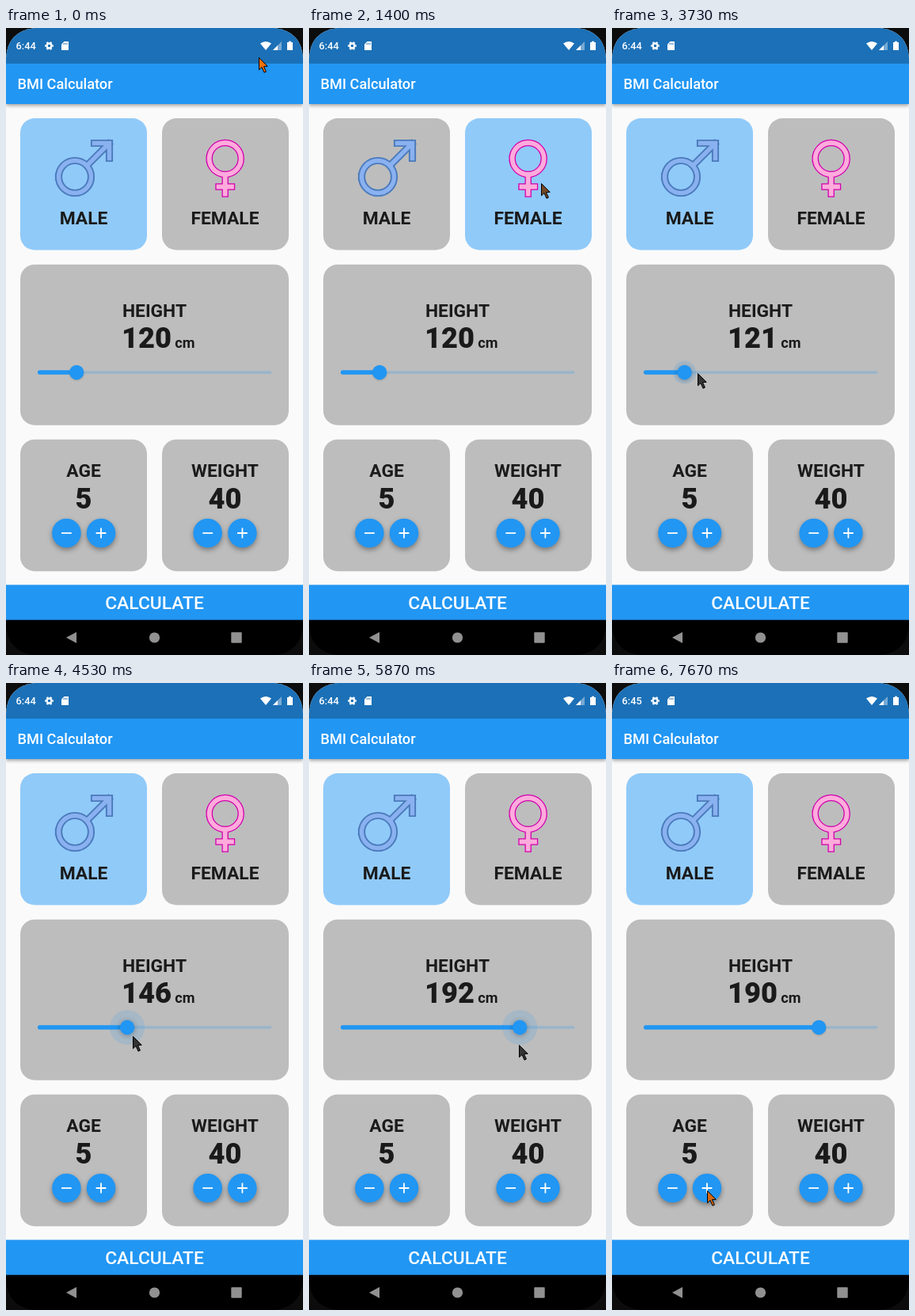
An HTML page that plays this animation: 375 px wide and 792 px high, repeating every 8 s.

```html
<!DOCTYPE html>
<html lang="en">
<head>
<meta charset="utf-8">
<title>BMI Calculator</title>
<style>
  html, body { margin: 0; width: 100%; height: 100%; overflow: hidden; background: #0c0c0c; }
  svg { display: block; width: 375px; height: 792px; font-family: Roboto, sans-serif; }
  .card { fill: #bdbdbd; }
  .card.on { fill: #90caf9; }
  .label, .number, .unit { fill: #1a1a1a; font-weight: 700; }
  .label { font-size: 22.8px; text-anchor: middle; }
  .number { font-size: 36.2px; font-weight: 900; }
  .unit { font-size: 18.2px; }
  .mid { text-anchor: middle; }
  .white { fill: #fff; font-weight: 500; }
  .bar { filter: drop-shadow(0 2px 2px rgba(0, 0, 0, .36)); }
  .button { filter: drop-shadow(0 3px 3px rgba(0, 0, 0, .36)); }
  .sign path { fill: none; stroke-linecap: square; }
</style>
</head>
<body>
<svg viewBox="0 0 375 792">
  <clipPath id="screen"><path d="M0 754V38Q2 4 36 0H339Q373 4 375 38V754Q373 788 339 792H36Q2 788 0 754Z"/></clipPath>

  <g clip-path="url(#screen)">
    <rect width="375" height="748" fill="#fafafa"/>
    <rect class="bar" y="45" width="375" height="51" fill="#2196f3"/>
    <rect width="375" height="45" fill="#1b70b7"/>
    <rect y="703.4" width="375" height="45" fill="#2196f3"/>
    <rect y="747.7" width="375" height="45"/>
  </g>

  <!-- status bar -->
  <text id="clock" class="white" x="12.5" y="27" font-size="12.8"></text>
  <g fill="#fff">
    <g fill="none" stroke="#fff">
      <circle cx="54.5" cy="22.5" r="3" stroke-width="2.4"/>
      <circle cx="54.5" cy="22.5" r="4.7" stroke-width="1.5" pathLength="12" stroke-dasharray="1" stroke-dashoffset=".5"/>
    </g>
    <path d="M73.5 17H79V28H70V20.5Z"/>
    <path d="M321 19.6Q328 14.4 335 19.6L328 28Z"/>
    <path d="M348 17V28H337Z" opacity=".4"/>
    <path d="M343 22V28H337Z"/>
    <path d="M355 18H357V16.7H360V18H362V28H355Z"/>
  </g>
  <path d="M73 19V21M75 19V21M77 19V21" stroke="#1b70b7" stroke-width=".9"/>
  <text class="white" x="14.5" y="77" font-size="18.2">BMI Calculator</text>

  <!-- gender cards -->
  <rect id="maleCard" class="card" x="18" y="114" width="160" height="166.5" rx="18.3"/>
  <rect id="femaleCard" class="card" x="197" y="114" width="160" height="166.5" rx="18.3"/>
  <g id="signs" class="sign"></g>
  <text class="label" x="98" y="248">MALE</text>
  <text class="label" x="276.5" y="248">FEMALE</text>

  <!-- height card -->
  <rect class="card" x="18" y="298.7" width="339" height="203" rx="18.3"/>
  <text class="label" x="187.5" y="365">HEIGHT</text>
  <text id="height" class="number" x="146" y="404"></text>
  <text class="unit" x="213.3" y="404">cm</text>
  <path d="M42 435H333.5" stroke="#98b4ca" stroke-width="3.7" stroke-linecap="round"/>
  <path id="active" stroke="#2196f3" stroke-width="5.5" stroke-linecap="round"/>
  <circle id="halo" cy="435" fill="#2196f3" opacity=".14"/>
  <circle id="thumb" cy="435" r="9.2" fill="#2196f3"/>

  <!-- age and weight cards -->
  <rect class="card" x="18" y="519.7" width="160" height="166.5" rx="18.3"/>
  <rect class="card" x="197" y="519.7" width="160" height="166.5" rx="18.3"/>
  <text class="label" x="98" y="567.3">AGE</text>
  <text class="label" x="276.5" y="567.3">WEIGHT</text>
  <text class="number mid" x="98" y="607">5</text>
  <text class="number mid" x="276.5" y="607">40</text>
  <g id="buttons"></g>

  <!-- bottom bars -->
  <text class="white mid" x="187.5" y="733.6" font-size="22.8">CALCULATE</text>
  <g fill="#919191">
    <path d="M76 770L89 763V777Z"/>
    <circle cx="187.5" cy="770" r="6.6"/>
    <rect x="284.3" y="763.3" width="13.4" height="13.4" rx="1"/>
  </g>

  <path id="cursor" d="M.5 .5V15.8L4 12.5L7 19.2L9.4 18.1L6.5 11.6L11.2 11.3Z" stroke="#000" stroke-linejoin="round"/>
</svg>

<script>
const $ = id => document.getElementById(id);
const LOOP = 8000, STEPS = 120;

const ring = (x, y, r) => `M${x - r} ${y}a${r} ${r} 0 1 0 ${2 * r} 0a${r} ${r} 0 1 0 ${-2 * r} 0`;
// Each sign is a wide outline stroke with a narrower fill stroke on top.
const sign = (d, dark, light, wide, narrow) =>
  `<path d="${d}" stroke="${dark}" stroke-width="${wide}"/><path d="${d}" stroke="${light}" stroke-width="${narrow}"/>`;
$('signs').innerHTML =
  sign(ring(87, 188, 20.5) + 'M105.5 170.5L129.5 146.5M111.5 145.5H130.5V164.5', '#4a7abb', '#8ab1f0', 9.2, 5.4) +
  sign(ring(276.7, 165, 20) + 'M276.7 189V209.5M268.5 200.5H285', '#d100ad', '#ffabdc', 8.4, 5.8);

$('buttons').innerHTML = [76.4, 120, 254.7, 298.4].map((x, i) =>
  `<g transform="translate(${x} 638)"><circle class="button" r="18.3" fill="#2196f3"/>
   <path d="M-6.4 0H6.4${i % 2 ? 'M0-6.4V6.4' : ''}" stroke="#fff" stroke-width="1.8"/></g>`).join('');

const ramp = (step, from, to) => Math.min(1, Math.max(0, (step - from) / (to - from)));
const pulse = (step, from, to, fade) => ramp(step, from, from + fade) * (1 - ramp(step, to, to + fade));
const mix = (from, to, f) => from + (to - from) * f;

// Pointer trips in steps; a bow bends the straight way sideways.
const trips = [
  { from: 0, to: 4, x: 314, y: 172, bowX: -53 },
  { from: 7, to: 12, x: 293, y: 196 },
  { from: 29, to: 35, x: 80, y: 221, bowY: 36 },
  { from: 43, to: 52, x: 108, y: 436 },
  { from: 56, to: 68, x: 160, y: 446 },
  { from: 68, to: 79, x: 273, y: 457, bowY: 8 },
  { from: 85, to: 88, x: 265, y: 457 },
  { from: 92, to: 94, x: 261, y: 457 },
  { from: 101, to: 115, x: 120, y: 641, bowX: -20, bowY: 110 },
];
const drags = [
  { from: 55.5, to: 69.7, value: 150 },
  { from: 69.7, to: 79, value: 195 },
  { from: 85, to: 88, value: 192 },
  { from: 92, to: 94, value: 190 },
];

function pointerAt(step) {
  let x = 319, y = 37;
  for (const { from, to, bowX = 0, bowY = 0, ...end } of trips) {
    const f = ramp(step, from, to), bend = Math.sin(Math.PI * f);
    x = mix(x, end.x, f) + bowX * bend;
    y = mix(y, end.y, f) + bowY * bend;
  }
  return [Math.round(x), Math.round(y)];
}

const heightAt = step =>
  Math.round(drags.reduce((value, drag) => mix(value, drag.value, ramp(step, drag.from, drag.to)), 120));

function draw() {
  const step = Math.floor((performance.now() % LOOP + 4) / LOOP * STEPS) % STEPS;
  const height = heightAt(step);
  const thumbX = 40 + (height - 100) * 295 / 120;
  const halo = 22 * pulse(step, 54, 101, 3);
  const press = .65 * pulse(step, 20, 29, 1) + .7 * pulse(step, 39, 43, 1)
    + pulse(step, 54, 101, 2) + .15 * ramp(step, 114, 115);
  const female = step >= 21 && step < 40;

  $('clock').textContent = step < 108 ? '6:44' : '6:45';
  $('maleCard').classList.toggle('on', !female);
  $('femaleCard').classList.toggle('on', female);
  $('height').textContent = height;
  $('active').setAttribute('d', `M42.7 435H${thumbX}`);
  $('thumb').setAttribute('cx', thumbX);
  $('thumb').style.filter = `drop-shadow(0 1px ${1 + halo / 9}px rgba(0,0,0,${.15 + halo / 150}))`;
  $('halo').setAttribute('cx', thumbX);
  $('halo').setAttribute('r', halo);
  $('cursor').setAttribute('transform', `translate(${pointerAt(step)})`);
  $('cursor').setAttribute('fill', `rgb(${[240, 112, 12].map(c => mix(c, 52, press))})`);
  requestAnimationFrame(draw);
}
draw();
</script>
</body>
</html>
```
